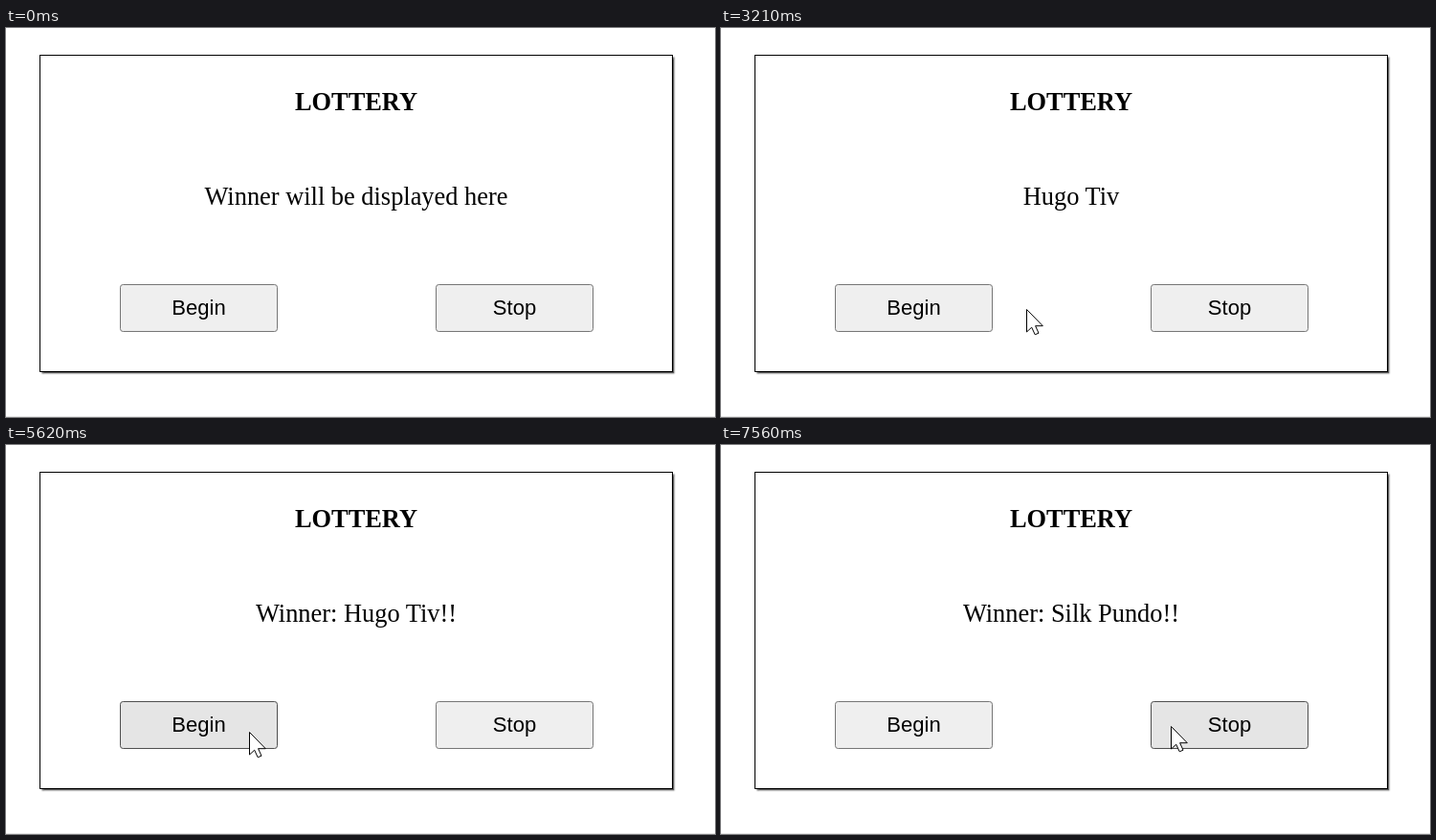
Animation of 741 by 407 pixels, one loop 8 s. Source, as an HTML page:

```html
<!DOCTYPE html>
<html lang="en">
<head>
<meta charset="utf-8">
<title>Lottery</title>
<style>
  html, body { margin: 0; width: 100%; height: 100%; overflow: hidden; background: #fff; }
  #stage { position: relative; width: 741px; height: 407px; overflow: hidden; color: #000; }
  #stage > * { position: absolute; box-sizing: border-box; }
  .card {
    left: 35px; top: 28px; width: 662px; height: 332px;
    border: 1px solid #000; background: #fff;
    box-shadow: 1.65px 1.65px 1.65px #555;
  }
  .line {
    left: 36px; width: 660px; text-align: center; white-space: nowrap;
    font: 26.4px/30px "Liberation Serif", "Times New Roman", serif;
  }
  .title { top: 62px; font-weight: bold; }
  #result { top: 161px; }
  .button {
    top: 268px; width: 165px; height: 50px;
    border: 1px solid #767676; border-radius: 3.3px; background: #efefef;
    font: 22px/47px "Liberation Sans", Arial, sans-serif; text-align: center;
  }
  .button.hover { background: #e5e5e5; border-color: #4f4f4f; }
  .button.active { background: #f5f5f5; border-color: #8d8d8d; }
  #begin { left: 119px; }
  #stop { left: 449px; }
  .rule { left: 0; top: 406px; width: 741px; height: 1px; background: #e8e8e8; }
  #cursor { left: 0; top: 0; width: 22px; height: 30px; overflow: visible; }
</style>
</head>
<body>
<div id="stage">
  <div class="card"></div>
  <div class="line title">LOTTERY</div>
  <div class="line" id="result"></div>
  <div class="button" id="begin">Begin</div>
  <div class="button" id="stop">Stop</div>
  <div class="rule"></div>
  <svg id="cursor" viewBox="0 0 22 30">
    <path d="M.5 .5V24L5.7 19.2L9.2 26.8L13 25.2L9.6 17.7H17.3Z" fill="#fff" stroke="#000"/>
  </svg>
</div>
<script>
const LOOP = 8000;
const TICK = 69;
const names = ["Hugo Tiv", "Mara Quell", "Dorin Pask", "Silk Pundo", "Elna Brood"];

const ease = {
  in: u => u ** 1.5,
  out: u => 1 - (1 - u) ** 1.6,
  both: u => u * u * (3 - 2 * u)
};

// Pointer moves: first step, last step, target, easing
const home = [380, 420];
const moves = [
  [1040, 1390, [227, 283], "out"],
  [2860, 3210, [319, 294], "in"],
  [3280, 3630, [468, 300], "out"],
  [5140, 5620, [254, 300], "both"],
  [6180, 6870, [400, 295], "in"],
  [6940, 7285, [470, 294], "out"]
];

// Mouse held down: from, to
const presses = [[2650, 2790], [3900, 3970], [6040, 6110], [7490, 7560]];

// Draws: start, last shuffle, announcement, name offset, winner
const draws = [
  { start: 2790, last: 3900, end: 3970, offset: 3, winner: names[0] },
  { start: 6110, last: 7350, end: 7560, offset: 1, winner: names[3] }
];

const cursor = document.getElementById("cursor");
const result = document.getElementById("result");
const buttons = [
  { el: document.getElementById("begin"), x: 119 },
  { el: document.getElementById("stop"), x: 449 }
];

const ticks = (t, start) => Math.floor((t - start + 3) / TICK);

function pointerAt(t) {
  let pos = home;
  for (const [start, end, target, kind] of moves) {
    if (t < start) break;
    const count = Math.round((end - start) / 69.3) + 1;
    const k = ease[kind](Math.min(1, (ticks(t, start) + 1) / count));
    pos = pos.map((p, i) => Math.round(p + (target[i] - p) * k));
  }
  return pos;
}

function textAt(t) {
  const draw = draws.filter(d => t >= d.start).pop();
  if (!draw) return "Winner will be displayed here";
  if (t >= draw.end) return `Winner: ${draw.winner}!!`;
  const step = ticks(Math.min(t, draw.last), draw.start);
  return names[(step * 2 + draw.offset) % names.length];
}

function render(t) {
  const [x, y] = pointerAt(t);
  const down = presses.some(([from, to]) => t >= from && t < to);
  cursor.style.transform = `translate(${x}px, ${y}px)`;
  for (const b of buttons) {
    const over = x >= b.x && x < b.x + 165 && y >= 268 && y < 318;
    b.el.classList.toggle("hover", over);
    b.el.classList.toggle("active", over && down);
  }
  const text = textAt(t);
  if (result.textContent !== text) result.textContent = text;
}

const origin = performance.now();
function frame() {
  render((performance.now() - origin) % LOOP);
  requestAnimationFrame(frame);
}
frame();
</script>
</body>
</html>
```
